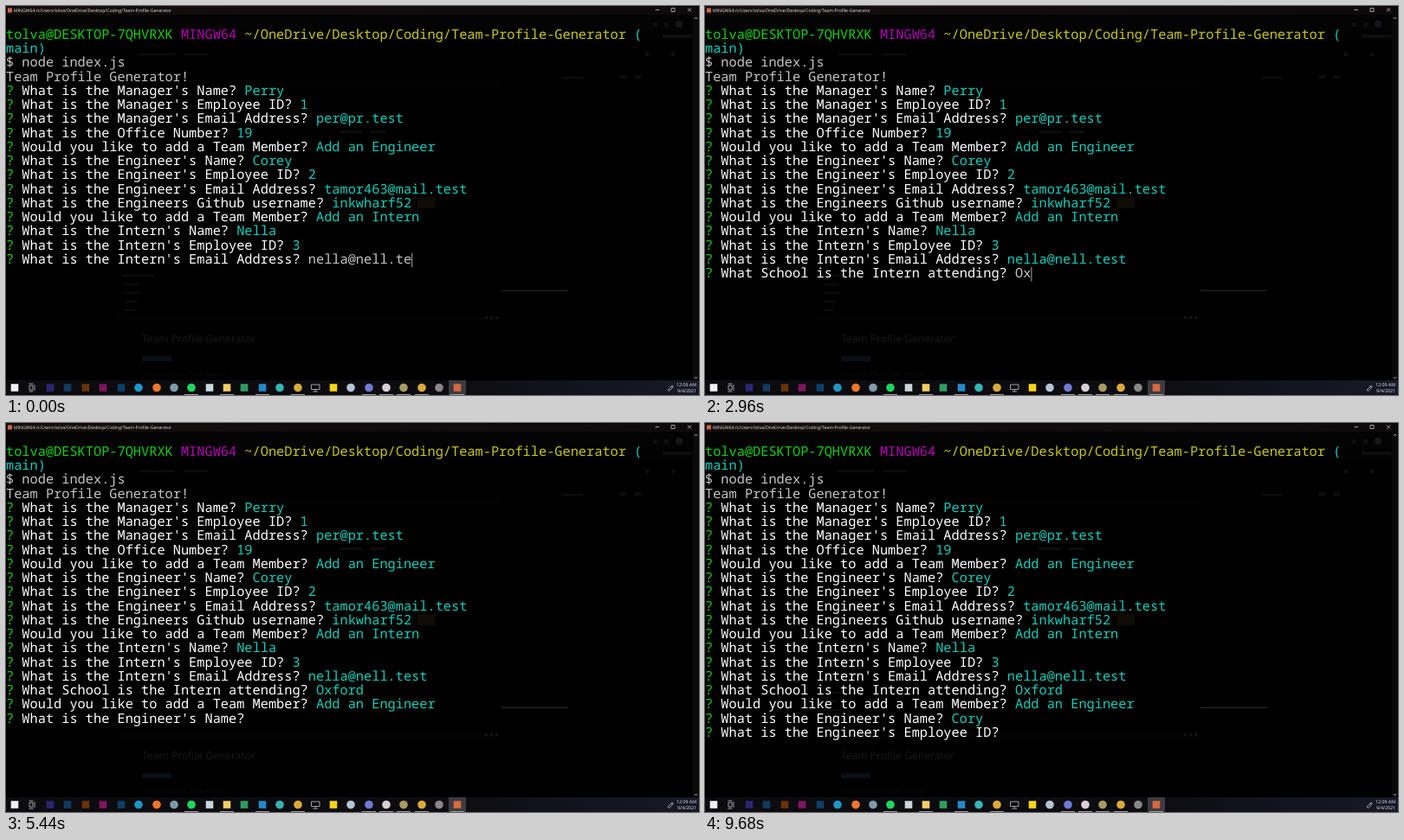
Animation of 800x450 px, one loop 9.72 s. Source, as an HTML page:

```html
<!DOCTYPE html>
<html lang="en">
<head>
<meta charset="utf-8">
<title>Terminal prompt</title>
<style>
  html, body { margin: 0; width: 100%; height: 100%; overflow: hidden; background: #000; }
  svg { display: block; width: 100vw; height: 100vh; }
  text { white-space: pre; text-rendering: geometricPrecision; }
  #rows { font: 15.3px "Noto Sans Mono", monospace; fill: #c4c4c4; }
  .small { font: 5.3px "Open Sans", sans-serif; fill: #e8e8e8; }
  .line { fill: none; stroke: #dcdcdc; stroke-width: .7; }
  .green { fill: #12d012; }
  .purple { fill: #b800b8; }
  .yellow { fill: #c8c814; }
  .white { fill: #fff; }
  .cyan { fill: #14ccba; }
</style>
</head>
<body>
<svg viewBox="0 0 800 450" preserveAspectRatio="none">
  <defs>
    <linearGradient id="titleFill">
      <stop offset="0" stop-color="#150d0e"/>
      <stop offset="1" stop-color="#0e0a0c"/>
    </linearGradient>
    <linearGradient id="taskFill">
      <stop offset=".6" stop-color="#0c0b0f"/>
      <stop offset="1" stop-color="#161a28"/>
    </linearGradient>
  </defs>
  <rect width="800" height="450" fill="#000"/>

  <!-- dim windows showing through the terminal -->
  <g opacity=".65">
    <path fill="#070606" d="M0 10H793V28H0z"/>
    <path fill="#040404" d="M0 28H793V41H0z"/>
    <path fill="#040404" d="M128 86H570V95H128zM128 356H570V365H128z"/>
    <path fill="#151515" d="M758 33h34v4h-34zM153 55h42v2h-42zM205 55h28v2h-28zM642 82h24v2h-24zM708 80h8v4h-8zM725 80h8v4h-8zM385 144h26v3h-26zM420 144h18v3h-18z"/>
    <path fill="#181818" d="M747 19h5v5h-5zM760 19h5v5h-5zM738 54h4v4h-4zM768 54h4v4h-4z"/>
    <circle cx="777" cy="21" r="4" fill="#26202a"/>
    <path fill="#1a1211" d="M134 311h38v2h-38zM137 321h16v2h-16zM137 331h18v2h-18zM137 341h14v2h-14zM137 351h12v2h-12z"/>
    <path fill="#171208" d="M475 221h21v13h-21z"/>
    <path fill="#37331e" d="M572 328.5h77v1.5h-77z"/>
    <path fill="#202020" d="M553 359h3v3h-3zM559 359h3v3h-3zM565 359h3v3h-3z"/>
    <text x="157" y="389" font-family="Open Sans, sans-serif" font-size="12.1" fill="#282828">Team Profile Generator</text>
    <path fill="#101722" d="M157 405h34v6h-34z"/>
    <text x="157" y="428" font-family="Open Sans, sans-serif" font-size="6.4" fill="#161616">Generates a Basic Team Website</text>
  </g>

  <!-- title bar -->
  <rect width="800" height="10" fill="url(#titleFill)"/>
  <rect x="2" y="2.5" width="5" height="5" fill="#c9694c"/>
  <text class="small" x="9" y="6.9" style="font-size:5.15px">MINGW64:/c/Users/tolva/OneDrive/Desktop/Coding/Team-Profile-Generator</text>
  <path class="line" d="M749.5 4.5h4.5M768 2.5h4v4h-4zM787 2.5l4 4M791 2.5l-4 4"/>

  <!-- scroll bar -->
  <rect x="793" y="10" width="7" height="423" fill="#0a0a0a"/>
  <path class="line" d="M794.8 15l1.7-2l1.7 2M794.8 429l1.7 2l1.7-2"/>

  <g id="rows"></g>
  <rect id="cursor" width="1" height="16.5" fill="#a5a5a5"/>

  <!-- taskbar -->
  <rect y="433" width="800" height="17" fill="url(#taskFill)"/>
  <rect x="511" y="433" width="20" height="17" fill="#3c3b40"/>
  <g id="icons"></g>
  <path class="line" d="M27 439h4v5h-4zM33 438v7M26.5 437h5M26.5 446h5"/>
  <path class="line" d="M352.5 438h9.5v5.5h-9.5zM357.2 443.5v2.2M354.5 446h5.5"/>
  <path class="line" d="M764 444l4-4l1.5 1.5l-4 4zM768 440q2-2 2 1"/>
  <text class="small" x="797" y="439.8" text-anchor="end">12:09 AM</text>
  <text class="small" x="797" y="447.3" text-anchor="end">9/4/2021</text>
</svg>

<script>
const LOOP = 9720, BLINK = 530;
const ADVANCE = 9.18, PITCH = 16.25, TOP = 25.75, ASCENT = 12.2;
const NS = "http://www.w3.org/2000/svg";
const rowsBox = document.getElementById("rows");
const cursor = document.getElementById("cursor");

function add(parent, tag, attrs, text = "") {
  const node = document.createElementNS(NS, tag);
  for (const key in attrs) node.setAttribute(key, attrs[key]);
  node.textContent = text;
  return parent.appendChild(node);
}

let rowCount = 0;
function addRow(...parts) {
  const row = add(rowsBox, "text", { x: 0, y: TOP + ASCENT + PITCH * rowCount++ });
  const spans = parts.map(([text, color]) => add(row, "tspan", { class: color }, text));
  return { row, spans, index: rowCount - 1 };
}

addRow(["tolva@DESKTOP-7QHVRXK ", "green"], ["MINGW64 ", "purple"],
  ["~/OneDrive/Desktop/Coding/Team-Profile-Generator", "yellow"], [" (", "cyan"]);
addRow(["main)", "cyan"]);
addRow(["$ node index.js", ""]);
addRow(["Team Profile Generator!", ""]);

// start: prompt appears, keys: key press times, done: answer accepted
const prompts = [
  ["What is the Manager's Name?", "Perry"],
  ["What is the Manager's Employee ID?", "1"],
  ["What is the Manager's Email Address?", "per@pr.test"],
  ["What is the Office Number?", "19"],
  ["Would you like to add a Team Member?", "Add an Engineer"],
  ["What is the Engineer's Name?", "Corey"],
  ["What is the Engineer's Employee ID?", "2"],
  ["What is the Engineer's Email Address?", "tamor463@mail.test"],
  ["What is the Engineers Github username?", "inkwharf52"],
  ["Would you like to add a Team Member?", "Add an Intern"],
  ["What is the Intern's Name?", "Nella"],
  ["What is the Intern's Employee ID?", "3"],
  ["What is the Intern's Email Address?", "nella@nell.test", { keys: [80, 280], done: 460 }],
  ["What School is the Intern attending?", "Oxford",
    { start: 460, keys: [2480, 2720, 3120, 3240, 3360, 3560], done: 3840 }],
  ["Would you like to add a Team Member?", "Add an Engineer", { start: 3840, done: 4580, menu: true }],
  ["What is the Engineer's Name?", "Cory", { start: 4580, keys: [8400, 8560, 8680, 8840], done: 9070 }],
  ["What is the Engineer's Employee ID?", "", { start: 9070, done: LOOP }],
].map(([question, answer, timing]) => ({
  question, answer, start: 0, keys: [], done: 0, menu: false, ...timing,
  ...addRow(["? ", "green"], [question + " ", "white"], ["", ""]),
}));

function drawPrompt(p, time) {
  const answered = time >= p.done;
  const pressed = p.keys.filter(key => key <= time);
  const hidden = p.menu ? p.answer.length : p.keys.length - pressed.length;
  const typed = answered ? p.answer : p.answer.slice(0, p.answer.length - hidden);
  p.row.style.display = time >= p.start ? "" : "none";
  p.spans[2].textContent = typed;
  p.spans[2].setAttribute("class", answered ? "cyan" : "");

  if (time < p.start || answered || p.menu) return;
  const idle = time - Math.max(p.start, ...pressed);
  if (idle % (2 * BLINK) >= BLINK) return;
  cursor.setAttribute("x", (p.question.length + 3 + typed.length) * ADVANCE);
  cursor.setAttribute("y", TOP + PITCH * p.index);
  cursor.style.display = "";
}

// x, color, shape (s: square, c: circle), u: underlined as open
const icons = [
  [10, "#f2f2f2", "s"], [51, "#2c2573", "s"], [71, "#12395c", "s"], [92, "#6a3208", "s"],
  [112, "#7d1560", "s"], [133, "#0d3f66", "s"], [153, "#1c95c9", "c"], [174, "#f0762b", "c"],
  [194, "#7f9aa8", "c"], [214, "#1ed760", "cu"], [235, "#c9d6da", "s"], [255, "#f2cf63", "su"],
  [275, "#2f9d62", "s"], [296, "#2489ca", "su"], [316, "#35b3b5", "c"], [337, "#dcaa3a", "cu"],
  [378, "#f5d415", "s"], [398, "#b4c6d6", "c"], [419, "#6f7ad6", "cu"], [439, "#d9cfd8", "cu"],
  [459, "#a79a62", "cu"], [480, "#dcaa3a", "cu"], [500, "#8b8785", "c"], [521, "#d6683f", "su"],
];
const iconBox = document.getElementById("icons");
for (const [x, fill, kind] of icons) {
  if (kind[0] === "c") add(iconBox, "circle", { cx: x, cy: 441.5, r: 4.8, fill });
  else add(iconBox, "rect", { x: x - 4.3, y: 437.2, width: 8.6, height: 8.6, fill });
  if (kind[1]) add(iconBox, "rect", { x: x - 8, y: 449, width: 16, height: 1, fill: "#a39a9c" });
}

function frame() {
  const time = performance.now() % LOOP;
  cursor.style.display = "none";
  for (const p of prompts) drawPrompt(p, time);
  requestAnimationFrame(frame);
}
frame();
</script>
</body>
</html>
```
